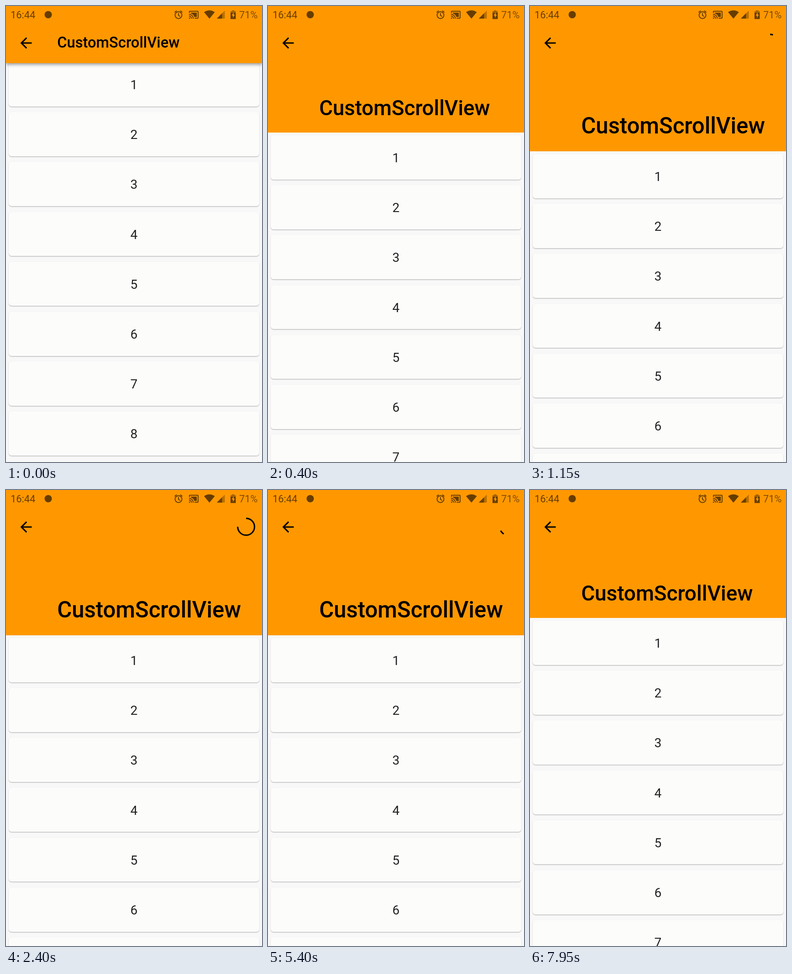
Write an HTML page that moves like this. It is 561x998 px and loops after 8 s.

```html
<!DOCTYPE html>
<html lang="en">
<head>
<meta charset="utf-8">
<title>CustomScrollView</title>
<style>
  html, body { margin: 0; width: 100%; height: 100%; overflow: hidden; }
  body { position: relative; background: #f8f8f8; font-family: Roboto, "Noto Sans", sans-serif; }
  #list, #bar, #shade, #icons { position: absolute; left: 0; top: 0; width: 561px; }
  .card {
    position: absolute; left: 6.2px; width: 548.6px; height: 96.7px;
    border-radius: 6px; background: #fcfcfb; color: #212121;
    font-size: 28px; line-height: 100px; text-align: center;
    box-shadow: 0 1.6px 1.6px rgba(0, 0, 0, .2), 0 .5px 2px rgba(0, 0, 0, .1);
  }
  #bar { background: #ff9800; }
  #shade { box-shadow: 0 3px 7px rgba(0, 0, 0, .42); }
  #icons { height: 998px; }
  #title { font-size: 32.7px; font-weight: 500; }
  .status { font-size: 21.8px; }
</style>
</head>
<body>
<div id="list"></div>
<div id="shade"></div>
<div id="bar"></div>
<svg id="icons" width="561" height="998" viewBox="0 0 561 998">
  <g fill="#663d00">
    <text class="status" x="10" y="27">16:44</text>
    <circle cx="92.5" cy="19" r="8"/>
    <g fill="none" stroke="#663d00" stroke-width="2">
      <circle cx="378" cy="20" r="7.5"/>
      <path d="M378 15.5V20.5L381.5 23M369.5 14L374 10.3M386.5 14L382 10.3"/>
    </g>
    <path transform="translate(400 7.7) scale(.955)" d="M1 18v3h3c0-1.66-1.34-3-3-3zm0-4v2c2.76 0 5 2.24 5 5h2c0-3.87-3.13-7-7-7zm18-7H5v1.63c3.96 1.28 7.09 4.41 8.37 8.37H19V7zM1 10v2c4.97 0 9 4.03 9 9h2c0-6.08-4.93-11-11-11zm20-7H3c-1.1 0-2 .9-2 2v3h2V5h18v14h-7v2h7c1.1 0 2-.9 2-2V5c0-1.1-.9-2-2-2z"/>
    <path d="M434 13.6Q445.800 5.500 457.500 13.600L445.800 27.800Z"/>
    <path d="M479.5 10V27.5H462Z" opacity=".45"/>
    <path d="M473.5 16V27.5H462Z"/>
    <path d="M495 11.5V9.5H500.5V11.5H503.5V15H492V11.5Z" opacity=".6"/>
    <path d="M492 15H503.5V28.5H492Z"/>
    <path d="M499 14L494.5 21H497.3V26L501.5 19H499Z" fill="#ff9800"/>
    <text class="status" x="511" y="27" opacity=".85">71%</text>
  </g>
  <path transform="translate(25.3 62.3) scale(1.558)" d="M20 11H7.83l5.59-5.59L12 4l-8 8 8 8 1.41-1.41L7.83 13H20z"/>
  <text id="title">CustomScrollView</text>
  <circle id="spin" cx="526.2" cy="80.5" r="18.4" pathLength="360" fill="none" stroke="#000" stroke-width="3.1"/>
</svg>
<script>
  const LOOP = 8000, STEP = 50;
  const FULL = 318, SMALL = 124.7, PITCH = 109.14;
  const PULL = 1150, HELD = 1650, SPIN = 2565, DONE = 5850;

  const $ = id => document.getElementById(id);
  const list = $('list'), bar = $('bar'), shade = $('shade'), title = $('title'), spin = $('spin');
  const clamp = x => Math.min(1, Math.max(0, x));

  for (let i = 0; i < 9; i++) {
    const card = document.createElement('div');
    card.className = 'card';
    card.style.top = FULL + 6.2 + i * PITCH + 'px';
    card.textContent = i + 1;
    list.append(card);
  }

  // scroll distance from the fully expanded position: [time, px]
  const track = [[0, 201], [50, 198], [100, 188], [150, 173], [200, 153.5], [250, 126], [300, 95],
    [350, 65], [400, 41], [450, 25], [500, 14], [600, 4], [700, 1], [850, 0],
    [7850, 0], [7900, 14], [7950, 38], [8000, 66]];

  function scrollAt(t) {
    const i = track.findIndex(p => p[0] > t);
    const [t0, a] = track[i - 1], [t1, b] = track[i];
    return a + (b - a) * (t - t0) / (t1 - t0);
  }

  // cubic-bezier(.4, 0, .2, 1)
  function ease(x) {
    if (x <= 0 || x >= 1) return clamp(x);
    let lo = 0, hi = 1, u;
    for (let i = 0; i < 24; i++) {
      u = (lo + hi) / 2;
      const bx = 1.2 * u * (1 - u) ** 2 + .6 * u * u * (1 - u) + u ** 3;
      if (bx < x) lo = u; else hi = u;
    }
    return 3 * u * u * (1 - u) + u ** 3;
  }

  function arc(start, sweep, cap) {
    spin.setAttribute('transform', `rotate(${start} 526.2 80.5)`);
    spin.setAttribute('stroke-dasharray', `${sweep} ${360 - sweep}`);
    spin.setAttribute('stroke-linecap', cap);
  }

  function drawSpinner(t) {
    const on = t >= PULL && t < DONE;
    spin.style.display = on ? '' : 'none';
    if (!on) return;
    if (t < SPIN) {
      const k = clamp((t - PULL) / (HELD - PULL));
      arc(-90, 20 + 250 * (1 - (1 - k) ** 1.5), 'butt');
    } else {
      const c = (t - SPIN) / 1000, turn = Math.floor(c), u = c - turn;
      const head = ease(u * 2), tail = ease(u * 2 - 1);
      arc(-90 + 270 * tail + 306 * u - 144 * turn, Math.max(270 * (head - tail), .1), 'square');
    }
  }

  function draw(t) {
    const s = scrollAt(t);
    const h = Math.max(SMALL, FULL - s);
    const scale = 1 + .5 * (h - SMALL) / (FULL - SMALL);
    list.style.transform = `translateY(${-s}px)`;
    bar.style.height = shade.style.height = h + 'px';
    shade.style.opacity = t < 1000 ? clamp(1 - (t - 60) / 250) : 0;
    title.setAttribute('transform', `translate(112.2 ${h - 25.1 - 9 * scale}) scale(${scale})`);
    drawSpinner(t);
  }

  const begin = performance.now();
  function tick() {
    const t = (performance.now() - begin) % LOOP;
    draw(Math.floor(t / STEP) * STEP);
    requestAnimationFrame(tick);
  }
  tick();
</script>
</body>
</html>
```
